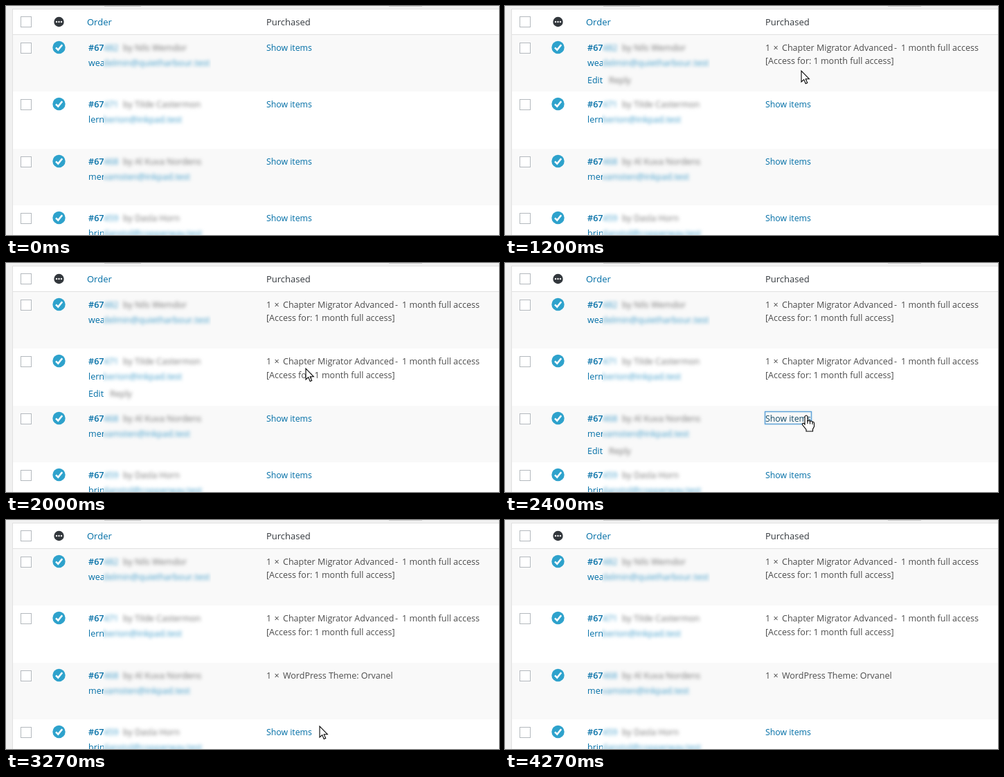
Recreate the animation shown at these times as an HTML page with a canvas. Size 712 by 332 pixels, loop 4340 ms.

```html
<!DOCTYPE html>
<html lang="en">
<head>
<meta charset="utf-8">
<title>Orders</title>
<style>
html, body { margin: 0; width: 100%; height: 100%; overflow: hidden; background: #f1f1f1; }
canvas { display: block; width: 712px; height: 332px; }
</style>
</head>
<body>
<canvas id="stage" width="712" height="332"></canvas>
<script>
const W = 712, H = 332, LOOP = 4340, STEP = 200 / 3;
const LINK = '#006ea6', TEXT = '#4c4c4c', DARK = '#32373c';
const stage = document.getElementById('stage').getContext('2d');
const baseCanvas = document.createElement('canvas');
baseCanvas.width = W;
baseCanvas.height = H;
const base = baseCanvas.getContext('2d');

const plan = 'Chapter Migrator Advanced';
const rows = [
  { y: 60, top: 42, num: '482', name: 'by Nils Wemdor', start: 'wea', mail: 'delmin@quietharbour.test',
    plan, second: 79, press: 590, load: 660, done: 1000 },
  { y: 142, top: 124, num: '471', name: 'by Tilde Castermon', start: 'lern', mail: 'berion@inkpad.test',
    plan, second: 162, press: 1595, load: 1730, done: 2000 },
  { y: 225, top: 207, num: '468', name: 'by Al Kuva Nordens', start: 'mer', mail: 'vamsten@inkpad.test',
    theme: 'WordPress Theme: Orvanel', press: 2330, load: 2465, done: 2730 },
  { y: 307, top: 289, num: '459', name: 'by Dasla Horn', start: 'brin', mail: 'danstol@copperway.test',
    press: Infinity, load: Infinity, done: Infinity }
];

// time, x, y of the pointer's hot spot
const path = [
  [66, 706, 2], [270, 520, 36], [465, 424, 62], [1000, 424, 62],
  [1270, 429, 100], [1470, 433, 139], [1930, 433, 139], [2200, 435, 221],
  [2800, 435, 221], [3070, 448, 280], [3265, 453, 299], [3530, 466, 336]
];

const arrow = new Path2D('M0 0V16L3.7 12.6L6.2 18.5L8.7 17.4L6.2 11.7H11.3Z');
const hand = new Path2D('M-2 1.5Q0 -1.5 2 1.5V8Q4 6.5 5.5 8.5Q7.5 7 9 9.5Q11 8.5 11.5 11V16L9.5 20V23H0V20.5L-5.5 13.5Q-6 11 -3.8 11.3L-2 13Z');
const creases = new Path2D('M2 7V12M5.5 8.5V12.5M9 9.5V13');

function label(c, s, x, y, color = TEXT, size = 12.5, weight = 400) {
  c.font = `${weight} ${size}px "Open Sans", "Noto Sans", sans-serif`;
  c.fillStyle = color;
  c.fillText(s, x, y);
}

function clipped(c, x, y, w, h, draw) {
  c.save();
  c.beginPath();
  c.rect(x, y, w, h);
  c.clip();
  draw();
  c.restore();
}

function blurred(c, s, x, y, color) {
  clipped(c, 140, y - 20, 156, 32, () => {
    c.filter = 'blur(2.7px)';
    label(c, s, x, y, color, 12.5, 500);
  });
}

function box(c, x, y, w, h, color) {
  c.fillStyle = color;
  c.fillRect(x, y, w, h);
}

function disc(c, x, y, r, color) {
  c.fillStyle = color;
  c.beginPath();
  c.arc(x, y, r, 0, 7);
  c.fill();
}

function checkbox(c, y) {
  box(c, 21, y, 16, 16, '#b4b9be');
  box(c, 22, y + 1, 14, 14, '#fff');
}

function tick(c, y) {
  disc(c, 76.5, y, 9.2, '#2ea2cc');
  c.strokeStyle = '#fff';
  c.lineWidth = 2.6;
  c.beginPath();
  c.moveTo(72, y + .3);
  c.lineTo(75.3, y + 3.6);
  c.lineTo(81.2, y - 3.8);
  c.stroke();
}

function drawBase(c) {
  box(c, 0, 0, W, H, '#f1f1f1');
  box(c, 142, 0, 53, 1, '#ccc');
  box(c, 553, 0, 48, 1, '#ccc');
  box(c, 9, 4, W, H, '#e1e1e1');
  box(c, 10, 5, W, 36, '#fff');
  checkbox(c, 15);
  disc(c, 76.5, 23, 7.2, DARK);
  for (let i = -1; i < 2; i++) disc(c, 76.5 + i * 3.5, 23, 1.2, '#fff');
  label(c, 'Order', 117, 28, LINK, 13);
  label(c, 'Purchased', 376, 28, DARK, 13);
  rows.forEach((r, i) => {
    box(c, 10, r.top, W, 83, i % 2 ? '#fff' : '#f9f9f9');
    checkbox(c, r.y - 7);
    tick(c, r.y);
    clipped(c, 110, r.top, 31, 83, () => {
      label(c, '#67', 119, r.y + 5, LINK, 12.6, 600);
      label(c, r.start, 119, r.y + 27, LINK);
    });
    blurred(c, r.num, 141, r.y + 5, '#3d9bc9');
    blurred(c, r.name, 169, r.y + 5, '#777');
    blurred(c, r.mail, 140, r.y + 27, '#3d9bc9');
  });
}

function pointer(t) {
  if (t < path[0][0] || t > path[path.length - 1][0]) return null;
  const i = path.findIndex(p => p[0] >= t) || 1;
  const [t0, x0, y0] = path[i - 1], [t1, x1, y1] = path[i];
  const k = (t - t0) / (t1 - t0), e = k * k * (3 - 2 * k);
  return { x: x0 + (x1 - x0) * e, y: y0 + (y1 - y0) * e };
}

function drawItems(c, r) {
  const y = r.y + 5;
  label(c, '1', 376, y);
  label(c, '×', 387.5, y);
  if (r.theme) return label(c, r.theme, 400, y);
  label(c, r.plan, 400, y);
  label(c, '-', 562, y);
  label(c, '1 month full access', 572, y);
  label(c, '[Access for: 1 month full access]', 376, r.second + 5);
}

function drawLink(c, r, focus, hover) {
  if (focus) {
    c.save();
    c.shadowColor = 'rgba(30,140,190,.8)';
    c.shadowBlur = 2;
    c.strokeStyle = '#5b9dd9';
    c.lineWidth = 1;
    c.strokeRect(375.5, r.y - 9.5, 67, 18);
    c.restore();
  }
  label(c, 'Show items', 376, r.y + 5, focus ? '#124964' : hover ? '#00a0d2' : LINK, 12.3);
}

function drawPointer(c, p, kind) {
  c.save();
  c.translate(Math.round(p.x), Math.round(p.y));
  c.strokeStyle = '#000';
  c.lineWidth = 1.1;
  if (kind === 'beam') {
    for (const x of [-3, 1]) {
      box(c, x, -8, 3, 1, '#000');
      box(c, x, 7, 3, 1, '#000');
    }
    box(c, 0, -7, 1, 14, '#000');
  } else {
    const shape = kind === 'hand' ? hand : arrow;
    c.fillStyle = '#fff';
    c.fill(shape);
    c.stroke(shape);
    if (kind === 'hand') c.stroke(creases);
  }
  c.restore();
}

function draw(t) {
  const c = stage, p = pointer(t);
  let kind = 'arrow';
  c.drawImage(baseCanvas, 0, 0);
  rows.forEach(r => {
    const inRow = p && p.y >= r.top && p.y < r.top + 82;
    const onText = inRow && Math.abs(p.y - r.y) < 9 && p.x > 375;
    const onLink = onText && p.x < 443;
    if (inRow) {
      label(c, 'Edit', 119, r.y + 52, LINK);
      blurred(c, 'Reply', 150, r.y + 52, '#777');
    }
    if (t < r.load) {
      drawLink(c, r, t >= r.press, onLink);
      if (onLink) kind = 'hand';
    } else {
      if (t < r.done) label(c, 'loading...', 376, r.y + 5);
      else drawItems(c, r);
      if (t < r.done ? onLink : onText && p.x < 683) kind = 'beam';
    }
  });
  if (p) drawPointer(c, p, kind);
}

drawBase(base);
const begin = performance.now();
function loop() {
  const t = (performance.now() - begin) % LOOP;
  draw(Math.min(64, Math.floor((t + 4) / STEP)) * STEP);
  requestAnimationFrame(loop);
}
loop();
</script>
</body>
</html>
```
